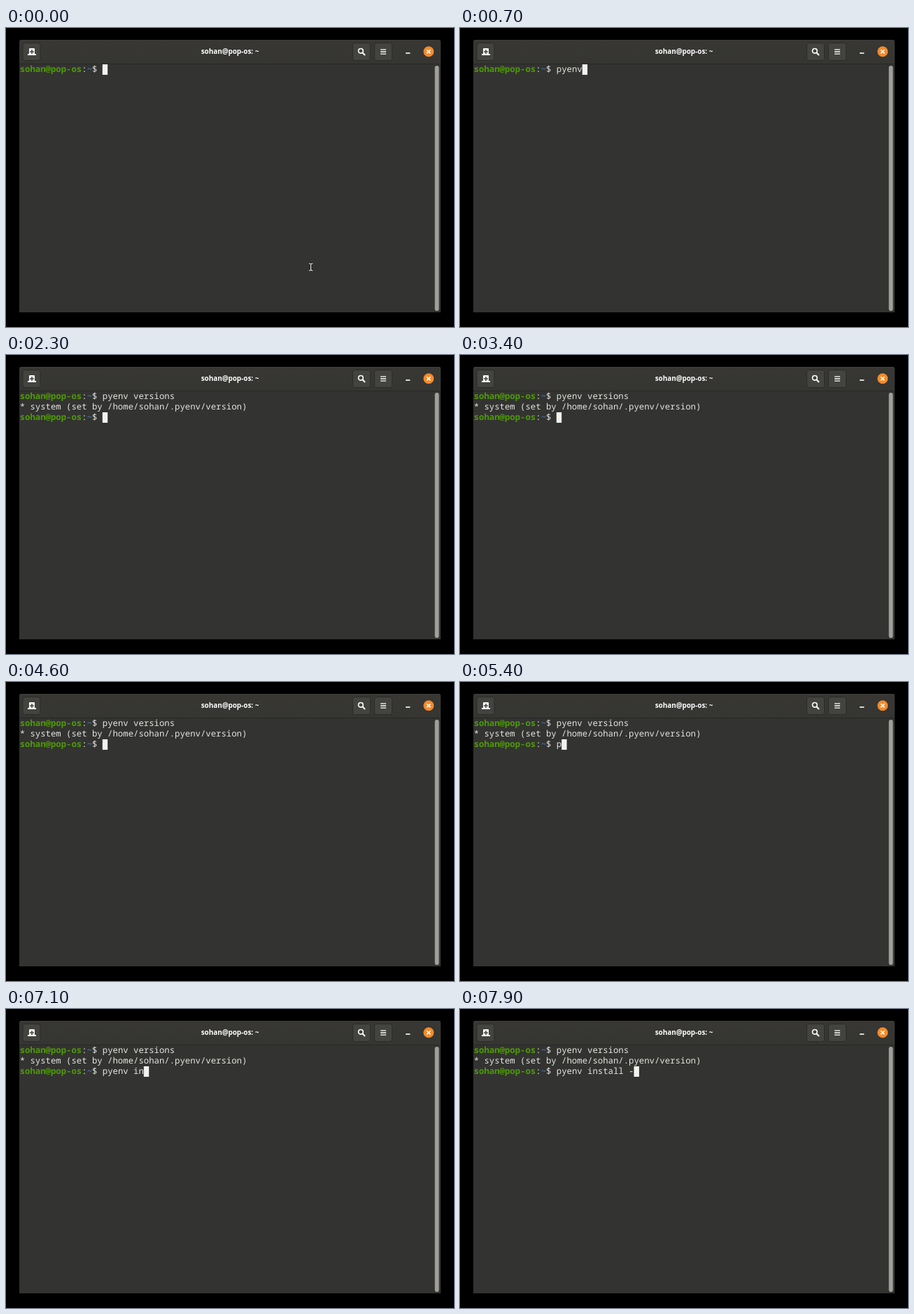
Write an HTML page that moves like this. It is 640 by 428 pixels and loops after 8000 ms.

```html
<!DOCTYPE html>
<html lang="en">
<head>
<meta charset="utf-8">
<title>Terminal</title>
<style>
  html, body { margin: 0; width: 100%; height: 100%; overflow: hidden; background: #000; }
  svg { display: block; }
  .term text {
    font: 12.3px "Noto Sans Mono", monospace;
    fill: #e4e4e0;
    white-space: pre;
    text-rendering: geometricPrecision;
  }
  .term .user { font-weight: 700; fill: #4e9a06; }
  .term .path { font-weight: 700; fill: #3f78a8; }
  .title { font: 700 9.9px "Open Sans", sans-serif; fill: #fff; text-anchor: middle; }
  .btn { fill: #434340; stroke: #2b2b29; }
  .icon { fill: none; stroke: #fff; stroke-width: 1.6; }
</style>
</head>
<body>
<svg width="640" height="428" viewBox="0 0 640 428">
  <defs>
    <linearGradient id="bar" x2="0" y2="1">
      <stop offset="0" stop-color="#383734"/>
      <stop offset="1" stop-color="#353532"/>
    </linearGradient>
    <path id="beam" d="M432.7 337.3H434.3L435.5 338.3L436.7 337.3H438.3M435.5 338V346.5M432.7 347.2H434.3L435.5 346.2L436.7 347.2H438.3"/>
    <rect id="button" y="21.5" width="25" height="25" rx="3"/>
  </defs>

  <path d="M19 407V20q0-3 3-3H618q3 0 3 3V407z" fill="#333331"/>
  <path d="M19 51V20q0-3 3-3H618q3 0 3 3V51z" fill="url(#bar)"/>
  <path d="M21 17.5H619" stroke="#403f3c"/>
  <path d="M19 51.5H621" stroke="#282826"/>
  <text class="title" x="320" y="37.2">sohan@pop-os: ~</text>

  <g class="btn">
    <use href="#button" x="24"/>
    <use href="#button" x="495.5"/>
    <use href="#button" x="526.5"/>
  </g>
  <path d="M33 37V30q0-1 1-1H40q1 0 1 1V37H43V39H31V37z" fill="#fff"/>
  <path d="M37 31V37M34 34H40" stroke="#434340" stroke-width="1.6"/>
  <g class="icon">
    <circle cx="506.8" cy="32.8" r="3.3"/>
    <path d="M509.2 35.2L513 39" stroke-width="2"/>
    <path d="M535 30.9H543M535 34H543M535 37.1H543" stroke-width="1.4"/>
    <path d="M571 36H577.3"/>
  </g>
  <circle cx="603.8" cy="33.8" r="7.5" fill="#f28b2c"/>
  <path class="icon" d="M601.2 31.2L606.4 36.4M606.4 31.2L601.2 36.4"/>

  <rect x="612.6" y="54" width="5.9" height="351" rx="2.9" fill="#a09f9a"/>

  <g class="term" id="term"></g>
  <rect id="cursor" width="7.4" height="15" fill="#f2f2ef"/>
  <g id="pointer" fill="none">
    <use href="#beam" stroke="#161615" stroke-width="2.6"/>
    <use href="#beam" stroke="#fff" stroke-width="1.1"/>
  </g>
</svg>

<script>
const LOOP = 8000, TICK = 100, BLINK = 600, REPLY = 100;
const LEFT = 19.7, CELL = 7.38, TOP = 52, LINE = 15, PROMPT = 16;

// Typing bursts: text, start and gap between keys in ms
const BURSTS = [
  ["py", 100, 100], ["e", 400], ["nv", 630, 60], [" v", 1100, 200],
  ["er", 1430, 60], ["sio", 1610, 40], ["ns\n", 2000, 100],
  ["py", 5400, 100], ["env ", 5800, 125], ["i", 6900],
  ["nstal", 7020, 93], ["l -", 7600, 150]
];

// The screen refreshes once per tick, so each key shows at the next one
const keys = BURSTS.flatMap(([text, start, gap = 0]) =>
  [...text].map((ch, i) => ({ ch, at: Math.ceil((start + i * gap) / TICK) * TICK })));
const replyAt = keys.find(key => key.ch === "\n").at + REPLY;

const byId = id => document.getElementById(id);
const term = byId("term"), cursor = byId("cursor"), pointer = byId("pointer");
const colX = col => LEFT + col * CELL;
const show = (el, on) => el.setAttribute("visibility", on ? "visible" : "hidden");

function make(tag, parent) {
  return parent.appendChild(document.createElementNS("http://www.w3.org/2000/svg", tag));
}

function addText(parent, row, col, str, cls = "") {
  const el = make("text", parent);
  el.setAttribute("x", colX(col));
  el.setAttribute("y", TOP + row * LINE + 11);
  el.setAttribute("class", cls);
  el.textContent = str;
  return el;
}

function addPrompt(parent, row) {
  addText(parent, row, 0, "sohan@pop-os", "user");
  addText(parent, row, 12, ":");
  addText(parent, row, 13, "~", "path");
  addText(parent, row, 14, "$");
  return addText(parent, row, PROMPT, "");
}

const firstInput = addPrompt(term, 0);
const reply = make("g", term);
addText(reply, 1, 0, "* system (set by /home/sohan/.pyenv/version)");
const secondInput = addPrompt(reply, 2);

function render(t) {
  const pressed = keys.filter(key => key.at <= t);
  const [first, second] = pressed.map(key => key.ch).join("").split("\n");
  const replied = t >= replyAt;
  const waiting = second !== undefined && !replied;
  const idle = t - (pressed.at(-1)?.at ?? 0);

  firstInput.textContent = first;
  secondInput.textContent = second ?? "";
  show(reply, replied);
  show(pointer, !pressed.length);
  show(cursor, Math.floor(idle / BLINK) % 2 === 0);
  cursor.setAttribute("x", colX(waiting ? 0 : PROMPT + (second ?? first).length));
  cursor.setAttribute("y", TOP + LINE * (replied ? 2 : waiting ? 1 : 0));
}

const start = performance.now();
function tick() {
  render((performance.now() - start) % LOOP);
  requestAnimationFrame(tick);
}
tick();
</script>
</body>
</html>
```
